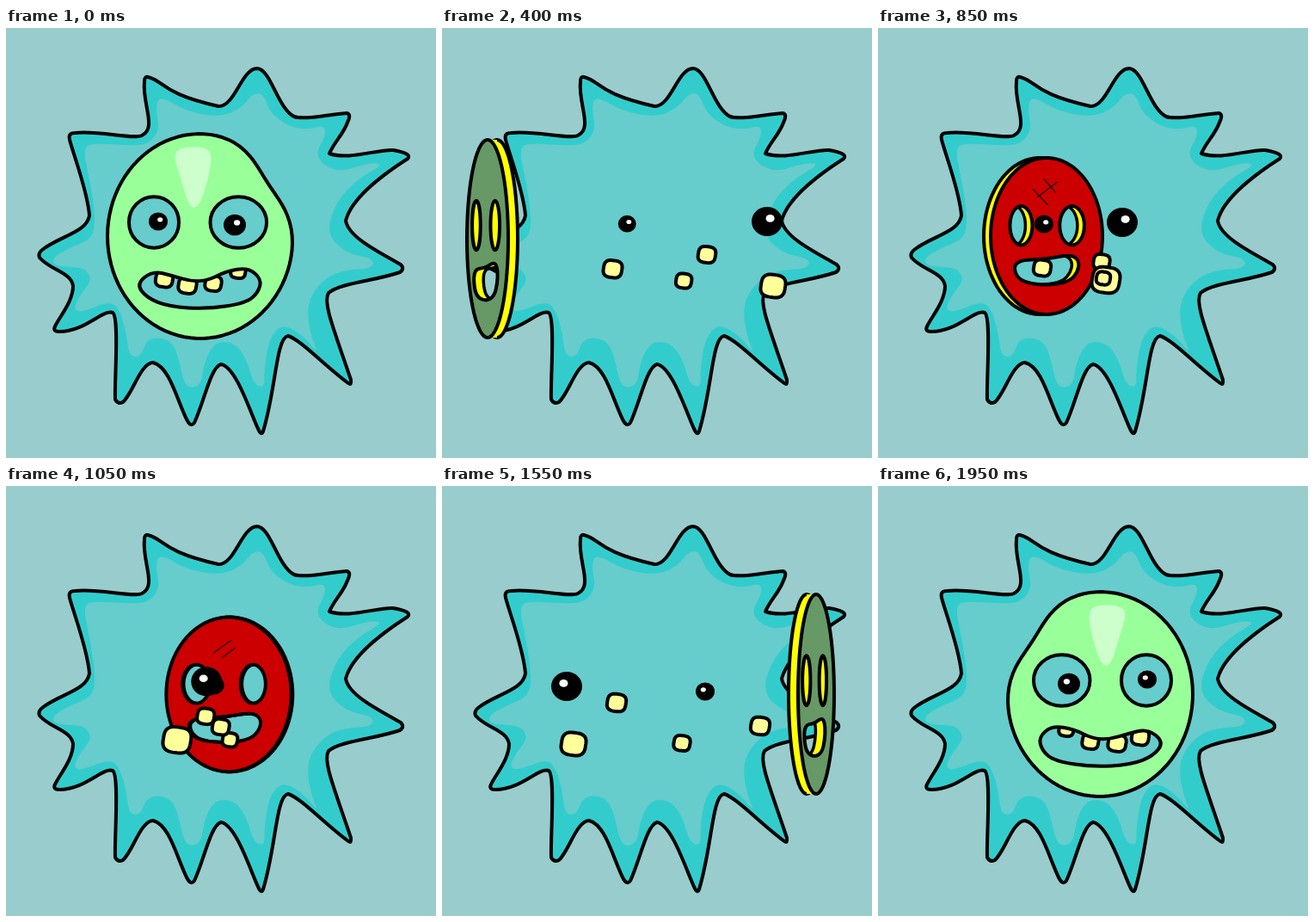
These frames come from a looping animation (500 px wide and 500 px high, 2000 ms). An HTML page with a canvas:

```html
<!DOCTYPE html>
<html>
<head>
<meta charset="utf-8">
<style>
html, body { margin: 0; width: 100%; height: 100%; overflow: hidden; background: #9cc; }
canvas { display: block; width: 500px; height: 500px; }
</style>
</head>
<body>
<canvas id="stage" width="500" height="500"></canvas>
<script>
const ctx = document.getElementById('stage').getContext('2d');
const layer = document.createElement('canvas');
layer.width = layer.height = 500;
const mk = layer.getContext('2d');
const LOOP = 2000, STEP = 50;

const body = new Path2D(
  'M165 57C185 62 180 76 247 91C266 92 274 47 292 47C308 48 315 92 335 103' +
  'C346 107 372 101 396 99Q402 100 397 110C392 124 382 132 376 146' +
  'C398 154 432 141 450 142Q473 146 467 152C445 166 402 196 395 224' +
  'C398 242 428 258 459 275Q464 280 458 284C430 294 390 296 375 308' +
  'C368 320 382 352 401 409Q402 416 398 413C372 394 342 362 328 358' +
  'C314 360 314 420 299 469Q297 474 294 468C285 450 268 394 250 391' +
  'C238 394 230 436 219 459Q215 465 210 455C198 430 190 394 171 389' +
  'C156 390 148 424 136 435Q130 438 127 432C126 410 132 336 124 331' +
  'C112 327 92 353 62 353Q54 353 57 347C62 336 78 318 78 300' +
  'C76 284 52 282 39 267Q37 262 42 258C62 242 94 238 97 218' +
  'C95 190 78 146 74 130Q72 122 80 122C110 119 146 130 158 125' +
  'C176 116 158 88 161 62Q161 56 165 57Z');

const glow = smooth(pairs([
  178,78, 210,97, 250,104, 275,92, 287,76, 299,76, 308,100, 330,115, 352,118, 370,113,
  372,125, 358,150, 385,169, 420,157, 440,158, 410,175, 385,200, 372,238, 395,262, 428,268,
  425,280, 395,281, 372,290, 355,310, 350,330, 355,360, 364,380, 345,357, 322,344, 306,360,
  300,400, 301,418, 288,415, 280,385, 265,365, 242,365, 230,390, 227,416, 209,419, 203,395,
  196,368, 180,359, 163,363, 157,382, 143,382, 140,355, 133,330, 122,317, 90,330, 78,328,
  86,310, 99,295, 95,283, 85,278, 56,277, 54,267, 75,255, 101,245, 104,220, 98,180,
  89,138, 105,134, 150,137, 167,134, 179,118, 174,95]));

// Mouth outlines in mask units: seen straight on, and turned away.
const wavy = pairs([-.67,.47, -.5,.34, -.29,.39, -.1,.445, .08,.437, .27,.345, .5,.31,
  .64,.42, .61,.55, .48,.655, .08,.715, -.33,.69, -.56,.605]);
const grin = pairs([-.57,.38, -.45,.31, -.2,.3, 0,.29, .15,.27, .3,.25, .47,.25,
  .57,.33, .54,.46, .4,.58, .05,.63, -.35,.6, -.52,.52]);
const shine = pairs([-.3,-.8, -.2,-.87, .06,-.87, .13,-.78, .06,-.48, -.01,-.31,
  -.08,-.26, -.15,-.35, -.21,-.56]);

// time, cx, cy, rx, ry, feature shift, rim depth
const maskKeys = [
  [0, 226, 242, 108, 119, -.045, 0],
  [100, 187, 244, 97, 122, -.07, 3],
  [200, 144, 247, 77, 122, -.1, 6],
  [400, 53, 245, 24, 115, -.09, 11],
  [450, 46, 244, 8, 111, 0, 11],
  [500, 55, 243, 11, 108, .09, 11],
  [550, 78, 243, 26, 105, .1, 11],
  [600, 105, 243, 39, 101, .09, 10],
  [850, 196, 242, 65, 91, 0, 8],
  [1000, 243, 242, 75, 90, -.05, 0],
  [1250, 327, 244, 52, 91, -.12, -6],
  [1450, 421, 242, 10, 106, -.1, -11],
  [1500, 437, 242, 9, 111, -.09, -11],
  [1550, 435, 242, 21, 116, -.08, -11],
  [1600, 422, 244, 36, 121, -.04, -10],
  [1650, 399, 245, 48, 124, .03, -9],
  [1750, 352, 247, 73, 122, .09, -6],
  [1850, 303, 244, 97, 121, .07, -3],
  [1950, 258, 242, 108, 119, .045, 0]];

// time, x, y, radius
const eyeKeys = [
  [[0,177,225,11], [200,207,226,10], [600,215,229,11], [850,193,228,11],
   [1250,296,236,11], [1550,306,239,11], [1950,313,225,11]],
  [[0,266,229,13], [200,343,226,16], [400,378,225,18], [600,342,225,18.5], [850,284,226,18],
   [1250,182,229,18], [1400,146,231,18], [1550,145,233,18], [1950,222,230,13]]];
const toothKeys = [
  [[0,270,283,9], [200,290,268,10], [600,314,263,11], [850,260,272,10],
   [1250,212,261,11], [1550,203,252,11.5], [1950,219,283,9]],
  [[0,211,299,11], [200,302,299,11.5], [400,385,300,15], [550,404,300,17], [600,383,300,17],
   [850,265,293,17], [1250,141,299,17], [1400,105,300,17], [1550,153,300,15], [1950,247,297,10]],
  [[0,241,297,10], [200,280,292,9], [600,274,296,10], [850,262,291,8.5],
   [1250,263,300,10], [1550,279,299,10], [1950,278,299,11]],
  [[0,184,292,10.5], [200,203,283,11], [600,191,279,11.5], [850,191,279,10.5],
   [1250,315,281,10.5], [1550,370,279,11.5], [1950,305,292,10.5]]];

function pairs(a) {
  const out = [];
  for (let i = 0; i < a.length; i += 2) out.push([a[i], a[i + 1]]);
  return out;
}

function smooth(pts) {
  const p = new Path2D(), n = pts.length;
  const mid = i => {
    const a = pts[i % n], b = pts[(i + 1) % n];
    return [(a[0] + b[0]) / 2, (a[1] + b[1]) / 2];
  };
  p.moveTo(...mid(n - 1));
  for (let i = 0; i < n; i++) p.quadraticCurveTo(...pts[i], ...mid(i));
  p.closePath();
  return p;
}

function oval(x, y, rx, ry) {
  const p = new Path2D();
  p.ellipse(x, y, rx, ry, 0, 0, Math.PI * 2);
  return p;
}

function moved(path, dx) {
  const p = new Path2D();
  p.addPath(path, { a: 1, b: 0, c: 0, d: 1, e: dx, f: 0 });
  return p;
}

// Cubic interpolation through timed keys.
function sample(keys, t) {
  let i = 0;
  while (i < keys.length - 2 && t >= keys[i + 1][0]) i++;
  const a = keys[i], b = keys[i + 1], p = keys[i - 1] || a, n = keys[i + 2] || b;
  const h = b[0] - a[0], u = Math.min(1, (t - a[0]) / h), u2 = u * u, u3 = u2 * u;
  return a.slice(1).map((v, k) => {
    const j = k + 1;
    const m0 = (b[j] - p[j]) / (b[0] - p[0]) * h;
    const m1 = (n[j] - a[j]) / (n[0] - a[0]) * h;
    return (2 * u3 - 3 * u2 + 1) * v + (u3 - 2 * u2 + u) * m0 +
      (3 * u2 - 2 * u3) * b[j] + (u3 - u2) * m1;
  });
}

function ink(c, path, fill, width = 4) {
  if (fill) { c.fillStyle = fill; c.fill(path); }
  c.lineWidth = width;
  c.strokeStyle = '#000';
  c.stroke(path);
}

function drawTooth([x, y, r]) {
  const p = new Path2D();
  for (let i = 0; i < 40; i++) {
    const a = i * Math.PI / 20, q = r * (1 - .06 * Math.cos(4 * a - .6));
    p.lineTo(x + q * Math.cos(a), y + q * .93 * Math.sin(a));
  }
  p.closePath();
  ink(ctx, p, '#ff9');
}

function drawEye([x, y, r], side) {
  ctx.fillStyle = '#000';
  ctx.fill(oval(x, y, r, r * .95));
  ctx.fillStyle = '#fff';
  ctx.fill(oval(x + side * r * .2, y - r * .2, r * .28, r * .24));
}

function drawParts(side, t) {
  toothKeys.forEach(k => drawTooth(sample(k, t)));
  eyeKeys.forEach(k => drawEye(sample(k, t), side));
}

function maskColor(cos) {
  if (cos > 0) return cos < .35 ? '#696' : cos < .6 ? '#80cc80' : '#9f9';
  return cos > -.5 ? '#633' : cos > -.8 ? '#933' : '#c00';
}

function drawMask(t, turn, side) {
  const [cx, cy, rx, ry, shift, rim] = sample(maskKeys, t);
  const cos = Math.cos(turn), front = cos > 0;
  const away = Math.min(turn, Math.PI * 2 - turn) * 180 / Math.PI;
  const w = Math.max(0, Math.min(1, 1.1 - away / 38));
  const d = front ? rim : -rim;
  const place = ([x, y]) => [cx + x * rx, cy + y * ry];

  const face = new Path2D();
  for (let i = 0; i < 90; i++) {
    const a = i * Math.PI / 45 - Math.PI;
    const q = 1 - .11 * w * Math.exp(-(((a + .62) / .42) ** 2));
    face.lineTo(cx + side * rx * q * Math.cos(a), cy + ry * q * Math.sin(a));
  }
  face.closePath();

  mk.clearRect(0, 0, 500, 500);
  mk.lineJoin = mk.lineCap = 'round';
  if (Math.abs(d) > 1) {
    const back = moved(face, d);
    ink(mk, back, '#ff0');
    mk.fillStyle = '#ff0';
    mk.fillRect(Math.min(cx, cx + d), cy - ry, Math.abs(d), ry * 2);
  }
  ink(mk, face, maskColor(cos));

  if (front && cos > .5) {
    mk.fillStyle = '#cfc';
    mk.fill(smooth(shine.map(([x, y]) => {
      const k = 1 - w;
      return place([side * x + k * .15 * side, y + k * .12 * (y > -.5 ? -1 : .2)]);
    })));
  } else if (cos < -.5) {
    const marks = side > 0
      ? [[-.24, -.6, .02, -.4], [-.05, -.73, .16, -.56], [-.16, -.5, .19, -.69]]
      : [[-.24, -.54, .04, -.7], [-.1, -.48, .1, -.6]];
    mk.beginPath();
    for (const [a, b, c, e] of marks) {
      mk.moveTo(...place([a, b]));
      mk.lineTo(...place([c, e]));
    }
    mk.lineWidth = 1.5;
    mk.strokeStyle = '#300';
    mk.stroke();
  }

  const socket = (s, r) => {
    const [x, y] = place([s * .455 + shift, -.135]);
    return oval(x, y, r * rx, .25 * ry);
  };
  const small = .2 + .07 * w, big = .22 + .085 * w;
  const mouth = smooth(grin.map(([gx, gy], i) => {
    const [wx, wy] = wavy[i];
    const flip = w > 0 ? side : 1;
    const x = flip * (gx + (wx - gx) * w) * 1.03 + shift * (1 - w);
    return place([x, gy + (wy - gy) * w]);
  }));
  const holes = [socket(-1, side > 0 ? small : big), socket(1, side > 0 ? big : small), mouth];

  for (const hole of holes) {
    const far = moved(hole, d);
    mk.save();
    mk.clip(hole);
    mk.fillStyle = '#ff0';
    mk.fill(hole);
    mk.globalCompositeOperation = 'destination-out';
    mk.fill(far);
    mk.globalCompositeOperation = 'source-over';
    if (Math.abs(d) > 1) ink(mk, far, null, 3.5);
    mk.restore();
    ink(mk, hole, null);
  }
  ctx.drawImage(layer, 0, 0);
}

function draw(now) {
  const t = Math.floor((now % LOOP) / STEP) * STEP;
  const turn = (t + STEP / 2) / LOOP * Math.PI * 2;
  const side = t < LOOP / 2 ? 1 : -1;
  const front = Math.cos(turn) > 0;

  ctx.lineJoin = ctx.lineCap = 'round';
  ctx.fillStyle = '#9cc';
  ctx.fillRect(0, 0, 500, 500);
  ctx.fillStyle = '#3cc';
  ctx.fill(body);
  ctx.fillStyle = '#6cc';
  ctx.fill(glow);
  ink(ctx, body, null);

  if (front) drawParts(side, t);
  drawMask(t, turn, side);
  if (!front) drawParts(side, t);
}

let start = null;
function tick(now) {
  if (start === null) start = now;
  draw(Math.max(0, now - start));
  requestAnimationFrame(tick);
}
draw(0);
requestAnimationFrame(tick);
</script>
</body>
</html>
```
